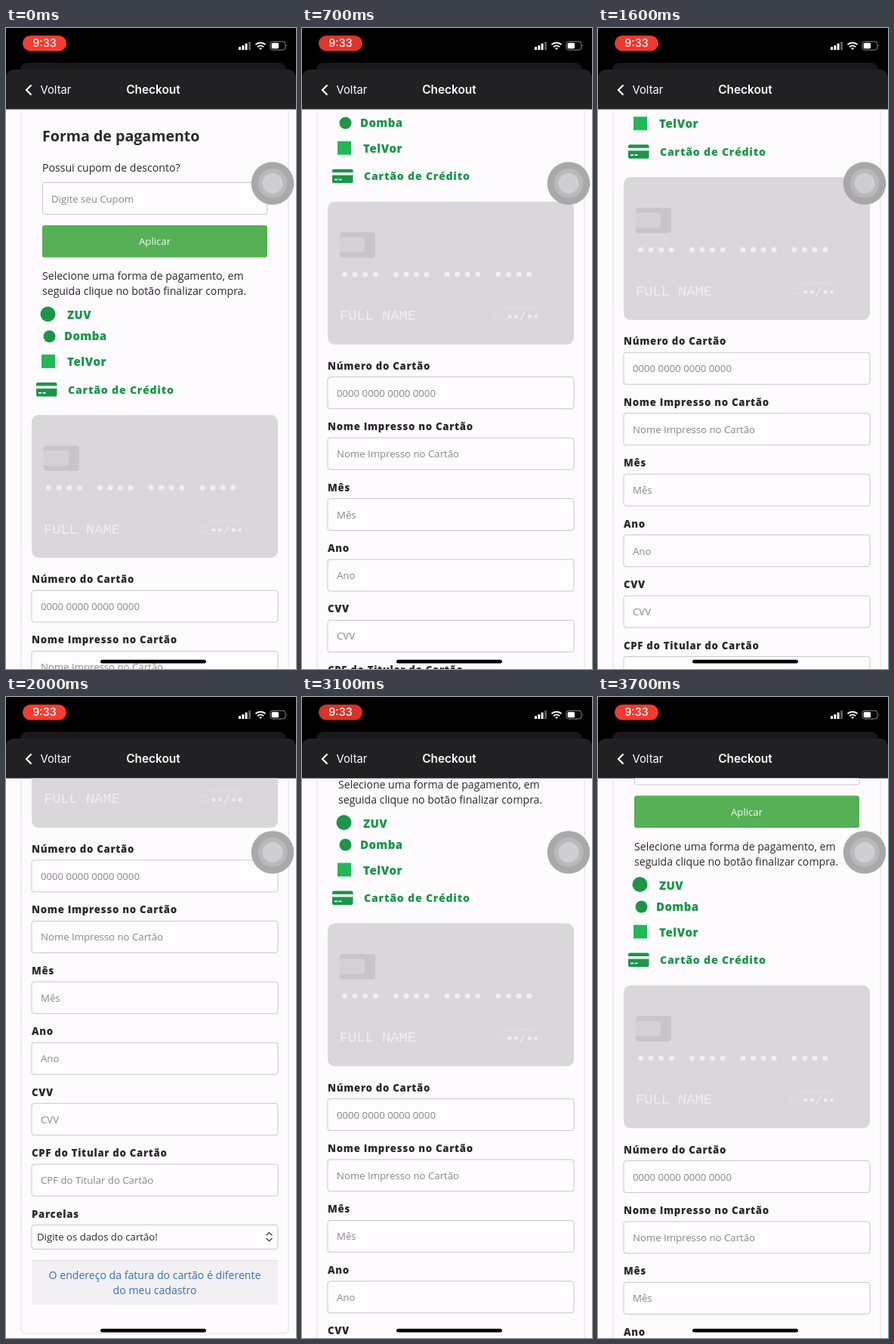
Animation, 384 px wide and 848 px high, one loop 3800 ms. Source, as an HTML page:

```html
<!DOCTYPE html>
<html lang="pt-BR">
<head>
<meta charset="utf-8">
<title>Checkout</title>
<style>
html, body { margin: 0; width: 100%; height: 100%; overflow: hidden; background: #000; }
svg { display: block; width: 384px; height: 848px; font-family: "Open Sans", sans-serif; }
.ui { font-family: Inter, sans-serif; fill: #fff; }
.mono { font-family: "Liberation Mono", monospace; }
</style>
</head>
<body>
<svg viewBox="0 0 384 848">
  <clipPath id="view"><rect y="107.6" width="384" height="741"/></clipPath>
  <rect width="384" height="848"/>
  <rect x="19" y="46" width="352" height="30" rx="9" fill="#19181b"/>
  <rect y="55" width="384" height="80" rx="10" fill="#212023"/>
  <rect y="107.6" width="384" height="741" fill="#fdfbfe"/>
  <g clip-path="url(#view)"><g id="page"></g></g>

  <g opacity=".94">
    <circle cx="353" cy="205.5" r="28.3" fill="#a4a3a5"/>
    <circle cx="353" cy="205.5" r="19.5" fill="#b5b4b6"/>
    <circle cx="353" cy="205.5" r="13.5" fill="#cdccce"/>
  </g>
  <rect x="125" y="835.8" width="140" height="4.8" rx="2.4"/>

  <rect id="pill" x="22" y="10" width="58" height="20.5" rx="10.2"/>
  <g class="ui">
    <text x="51" y="25.3" font-size="14.3" font-weight="500" text-anchor="middle">9:33</text>
    <text x="45.5" y="87" font-size="14.8">Voltar</text>
    <text x="195" y="87" font-size="15.4" font-weight="600" text-anchor="middle">Checkout</text>
    <path d="M308 25h3v4h-3zM312.3 23h3v6h-3zM316.6 20.5h3v8.5h-3z"/>
    <path d="M321 18h3v11h-3z" opacity=".35"/>
  </g>
  <path d="M33.5 75.5L27 82l6.5 6.5" fill="none" stroke="#fff" stroke-width="2.2"/>
  <g fill="none" stroke="#fff">
    <path d="M330.5 22a9.5 9.5 0 0 1 13 0M333 25a6 6 0 0 1 8 0" stroke-width="2"/>
    <path d="M337 29l-2-2.2a3 3 0 0 1 4 0z" fill="#fff" stroke="none"/>
    <rect x="350" y="18" width="20" height="11" rx="3.2" stroke="#8b8a8c"/>
  </g>
  <rect x="351.7" y="19.7" width="9.5" height="7.6" rx="1.7" fill="#fff"/>
  <path d="M371.6 21.7v3.6q1.6-1.8 0-3.6" fill="#8b8a8c"/>
</svg>
<script>
const DARK = '#2b292d', HINT = '#89878b', GREEN = '#1b9648', PALE = '#efeef0';
const parts = [];
const rect = (x, y, w, h, rx, fill, stroke = 'none') =>
  parts.push(`<rect x="${x}" y="${y}" width="${w}" height="${h}" rx="${rx}" fill="${fill}" stroke="${stroke}"/>`);
const dot = (x, y, r, fill) => parts.push(`<circle cx="${x}" cy="${y}" r="${r}" fill="${fill}"/>`);
const text = (x, y, str, size, fill, more = '') =>
  parts.push(`<text x="${x}" y="${y}" font-size="${size}" fill="${fill}" ${more}>${str}</text>`);
const box = (x, y, w, h) => rect(x + .5, y + .5, w - 1, h - 1, 3, '#fefcff', '#c9c7ca');
const heavy = (x, y, str, size, fill, gap = .7) =>
  text(x, y, str, size, fill, `font-weight="800" letter-spacing="${gap}"`);
const middle = 'text-anchor="middle"';

// panels
rect(20, -60, 354, 1430, 5, 'none', '#dfdde0');
rect(20, 1428, 354, 300, 5, 'none', '#dfdde0');

// coupon
text(48, 150, 'Forma de pagamento', 19.6, DARK, 'font-weight="700"');
text(48, 190, 'Possui cupom de desconto?', 14.1, DARK);
box(48, 204, 298.5, 43);
text(60, 230.5, 'Digite seu Cupom', 13.2, HINT);
rect(48, 261, 298, 42.5, 3, '#55b056');
text(197, 287, 'Aplicar', 13.2, '#f4fbf4', middle);
text(48, 333, 'Selecione uma forma de pagamento, em', 14.1, DARK);
text(48, 353, 'seguida clique no botão finalizar compra.', 14.1, DARK);

// payment methods
dot(55.5, 378.5, 10, GREEN);
heavy(81, 385, 'ZUV', 15, GREEN, .4);
dot(57.5, 408, 8, GREEN);
heavy(77, 413, 'Domba', 15, GREEN, .4);
rect(47, 432, 18, 18, 0, '#22b858');
heavy(81, 447, 'TelVor', 15, GREEN, .6);
rect(40, 469, 27.5, 18.5, 2, GREEN);
rect(40, 473.5, 27.5, 3.5, 0, '#fdfbfe');
rect(43, 482, 4, 1.7, 0, '#fdfbfe');
rect(48.5, 482, 4, 1.7, 0, '#fdfbfe');
heavy(82, 483.5, 'Cartão de Crédito', 14.1, GREEN, .8);

// card preview
rect(34, 512, 326, 189, 9, '#d9d7da');
rect(50, 552.5, 47, 33.5, 4, '#c7c5c9');
rect(50, 559, 33, 20, 4, '#d3d1d4');
for (let i = 0; i < 16; i++) dot(56.5 + (i >> 2) * 67.8 + (i & 3) * 13.6, 608.3, 3.5, PALE);
text(50, 668.5, 'FULL NAME', 18.7, PALE, 'class="mono"');
text(271, 655, 'MONTH/YEAR', 6.4, '#e6e4e7');
text(253, 662, 'VALID', 5, '#e3e1e4');
text(253, 668, 'THRU', 5, '#e3e1e4');
for (const x of [275, 283, 301.5, 309.5]) dot(x, 664, 2.4, PALE);
text(287.5, 669, '/', 15, PALE, 'class="mono"');

// form
['Número do Cartão', 'Nome Impresso no Cartão', 'Mês', 'Ano', 'CVV', 'CPF do Titular do Cartão']
  .forEach((name, i) => {
    const y = 734 + i * 80.45;
    heavy(34, y, name, 13.2, DARK);
    box(33.5, y + 9.5, 327, 43);
    text(46, y + 36, i ? name : '0000 0000 0000 0000', 13.2, HINT);
  });
heavy(34, 1217, 'Parcelas', 13.2, DARK);
box(33.5, 1226, 327, 33);
text(41, 1247, 'Digite os dados do cartão!', 13.2, DARK);
parts.push(`<path d="M344.5 1240.5l4-3.8 4 3.8m-8 3.5l4 3.8 4-3.8" fill="none" stroke="${DARK}" stroke-width="1.3"/>`);
rect(34, 1273, 326, 59, 0, '#f2f0f3');
rect(34, 1273, 326, 1, 0, '#e2e0e3');
text(197, 1298, 'O endereço da fatura do cartão é diferente', 14.1, '#3573ad', middle);
text(197, 1318, 'do meu cadastro', 14.1, '#3573ad', middle);

const page = document.getElementById('page');
const pill = document.getElementById('pill');
page.innerHTML = parts.join('');

// Each flick: a drag, then a glide that decays towards the resting place
const flicks = [
  { start: 0, drag: 300, rest: 297.7, left: 76.3 },
  { start: 1500, drag: 250, rest: 601.7, left: 200 },
  { start: 2620, drag: 130, rest: 122.3, left: -365.8 },
];
const GLIDE = 250;

function scrollAt(t, n = flicks.findLastIndex(f => t >= f.start)) {
  if (n < 0) return 0;
  const { start, drag, rest, left } = flicks[n];
  const u = (t - start) / drag;
  if (u >= 1) return rest - left * Math.exp((start + drag - t) / GLIDE);
  const from = scrollAt(start, n - 1);
  const speed = left / GLIDE * drag;
  return from + (rest - left - from) * u * u * (3 - 2 * u) + speed * u * u * (u - 1);
}

function draw(now) {
  const t = Math.floor(now % 3800 / 100) * 100;
  page.setAttribute('transform', `translate(0 ${-scrollAt(t).toFixed(1)})`);
  const glow = (1 + Math.cos(t * Math.PI / 1000)) / 2;
  pill.setAttribute('fill', `rgb(${216 + 35 * glow} ${51 + 8 * glow} ${42 + 6 * glow})`);
  requestAnimationFrame(draw);
}
draw(performance.now());
</script>
</body>
</html>
```
